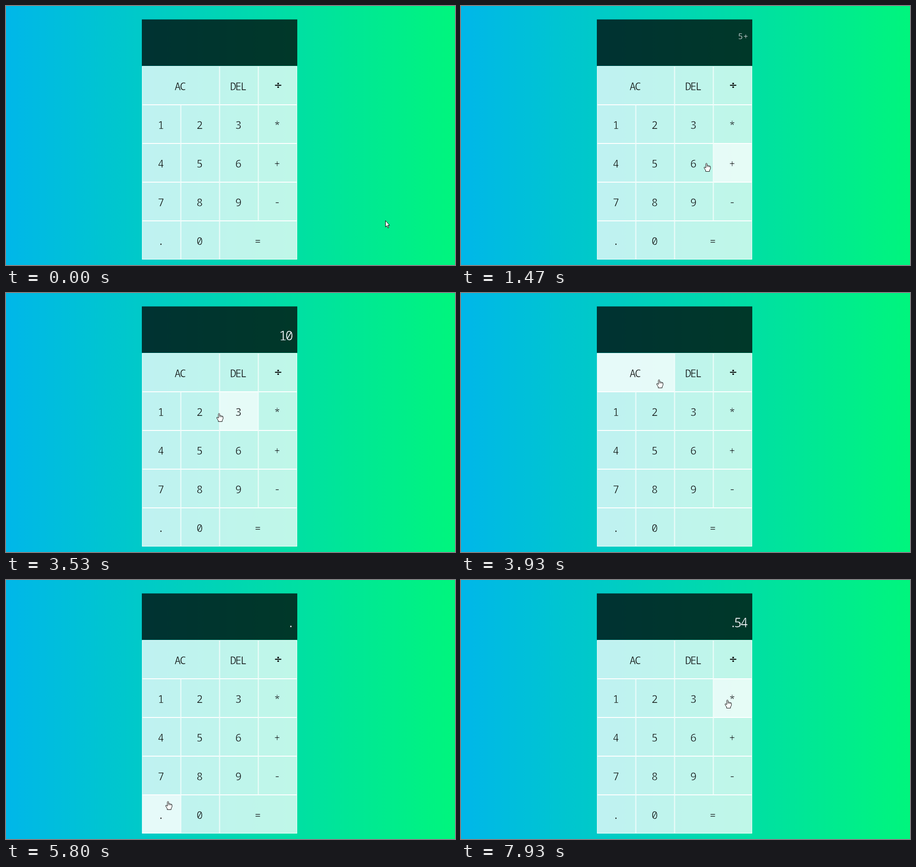
Recreate the animation shown at these times as an HTML page. Size 985 by 569 pixels, loop 8000 ms.

```html
<!DOCTYPE html>
<html lang="en">
<head>
<meta charset="utf-8">
<title>Calculator</title>
<style>
  html, body { margin: 0; width: 100%; height: 100%; overflow: hidden; }
  svg { display: block; width: 100%; height: 100%; }
  text {
    font-family: "Noto Sans Mono", "DejaVu Sans Mono", monospace;
    font-weight: 300;
    text-anchor: middle;
    stroke-width: .6;   /* a stroke in the ground colour thins the letters */
  }
  .key { --ground: #c0f3ec; --veil: .75; }
  .key.hover { --ground: #e5faf8; --veil: .9; }
  .key .face { fill: rgba(255, 255, 255, var(--veil)); }
  .key .edge { fill: none; stroke: #fff; }
  .key text { font-size: 23px; stroke: var(--ground); }
  .key .divide { font: 21px "DejaVu Sans", sans-serif; stroke: #000; }
  #prev, #cur { stroke: #003530; }
  #prev { font-size: 18px; fill: rgba(255, 255, 255, .8); stroke-width: .3; }
  #cur { font-size: 29px; fill: #fff; }
  #arrow, #hand { fill: #fff; stroke: #000; stroke-linejoin: round; }
</style>
</head>
<body>
<svg viewBox="0 0 985 569" preserveAspectRatio="none">
  <defs>
    <linearGradient id="sky" gradientUnits="userSpaceOnUse" x1="-201.5" x2="1138.5" y1="0" y2="0">
      <stop offset="0" stop-color="#00aaff"/>
      <stop offset="1" stop-color="#00ff6c"/>
    </linearGradient>
  </defs>
  <rect width="985" height="569" fill="url(#sky)"/>
  <rect x="298" y="29.5" width="341" height="102" fill="rgba(0,0,0,.75)"/>
  <text id="prev"></text>
  <text id="cur"></text>
  <g id="keys"></g>
  <g id="cursor">
    <path id="arrow" d="M.5.5V14.5L3.6 11.6L5.8 16.7L7.8 15.8L5.6 10.8H9.7Z"/>
    <g id="hand" transform="translate(.5 0)">
      <path d="M-1.5 1.5Q0-.8 1.3 1.5V5.4Q2.8 4.4 3.9 6Q5.4 5 6.4 6.7Q8.7 6 8.7 8.5V12.5L6.7 16V18.5H-1.8V16L-5 11Q-5.8 8.6-3.7 8.8L-1.5 11Z"/>
      <path d="M1.3 5.4V9M3.9 6V9M6.4 6.7V9.2" fill="none" stroke-width=".8"/>
    </g>
  </g>
</svg>
<script>
const LOOP = 8000, FPS = 15, LEFT = 298.5, TOP = 132, CELL = 85;
const $ = id => document.getElementById(id);

function add(parent, tag, attrs) {
  const el = document.createElementNS("http://www.w3.org/2000/svg", tag);
  for (const name in attrs) el.setAttribute(name, attrs[name]);
  return parent.appendChild(el);
}

// Labels by row; a repeated label makes one wide key.
const rows = ["AC AC DEL ÷", "1 2 3 *", "4 5 6 +", "7 8 9 -", ". 0 = ="].map(r => r.split(" "));
const keys = {};

rows.forEach((row, r) => row.forEach((label, c) => {
  if (keys[label]) return;
  const x = LEFT + c * CELL, y = TOP + r * CELL;
  const w = row.filter(s => s === label).length * CELL;
  const el = add($("keys"), "g", { class: "key" });
  add(el, "rect", { class: "face", x, y, width: w, height: CELL });
  add(el, "rect", { class: "edge", x: x + .5, y: y + .5, width: w - 1, height: CELL - 1 });
  const divide = label === "÷";
  const mid = x + w / 2 + (divide ? 1 : -1);
  const xs = [...label].map((_, i) => mid + (i - (label.length - 1) / 2) * 11.5);
  const text = add(el, "text", {
    class: divide ? "divide" : "label",
    x: xs.join(" "),
    y: y + (divide ? 48.5 : label === "-" ? 51 : 53)
  });
  text.textContent = label;
  keys[label] = { el, x: x + w / 2, y: y + CELL / 2 };
}));

// One visit per key; dx and dy lead away from the key's centre.
const visits = [
  { key: "5", leave: 70, arrive: 670, press: 800 },
  { key: "+", leave: 870, arrive: 1140, press: 1270, dx: -8 },
  { key: "5", leave: 1400, arrive: 1670, press: 1800 },
  { key: "=", leave: 1870, arrive: 2270, press: 2670, dx: 34, dy: 17 },
  { key: "AC", leave: 2940, arrive: 3800, press: 3930, dx: 50, dy: 15 },
  { key: "8", leave: 4200, arrive: 4930, dx: -25 },
  { key: ".", leave: 5140, arrive: 5530, press: 5730 },
  { key: "5", leave: 5740, arrive: 6200, press: 6400 },
  { key: "4", leave: 6540, arrive: 7000, press: 7200, dx: 6, dy: 14 },
  { key: "*", leave: 7210, arrive: 7930, dx: -12, dy: 3 }
];

const ease = k => 1 - (1 - k) ** 1.3;

function tipAt(t) {
  let x = 832, y = 471;
  for (const { key, leave, arrive, dx = 0, dy = 0 } of visits) {
    const k = ease(Math.min(1, Math.max(0, (t - leave) / (arrive - leave))));
    x += (keys[key].x + dx - x) * k;
    y += (keys[key].y + dy - y) * k;
  }
  return [x, y];
}

function keyAt([x, y]) {
  const row = rows[Math.floor((y - TOP) / CELL)];
  return row && row[Math.floor((x - LEFT) / CELL)];
}

function operandsAt(t) {
  let prev = "", cur = "";
  for (const { key, press } of visits) {
    if (!(press <= t)) continue;
    if (key === "AC") prev = cur = "";
    else if (key === "+") [prev, cur] = [cur + key, ""];
    else if (key === "=") [prev, cur] = ["", String(parseFloat(prev) + Number(cur))];
    else cur += key;
  }
  return [prev, cur];
}

// Right-aligned number; the point is narrower than a digit.
function show(id, str, y, right, advance) {
  const xs = [];
  for (const ch of [...str].reverse()) {
    const w = ch === "." ? advance / 2 : advance;
    xs.unshift(right - w / 2);
    right -= w;
  }
  const el = $(id);
  el.textContent = str;
  el.setAttribute("x", xs.join(" ") || 0);
  el.setAttribute("y", y);
}

function draw(t) {
  const step = Math.floor((t + 4) * FPS / 1000);
  const [x, y] = tipAt(step * 1000 / FPS);
  const over = keyAt(tipAt((step - 1) * 1000 / FPS));   // hover trails by one step
  for (const label in keys) keys[label].el.classList.toggle("hover", label === over);
  $("cursor").setAttribute("transform", `translate(${Math.round(x)} ${Math.round(y)})`);
  $("arrow").style.display = over ? "none" : "";
  $("hand").style.display = over ? "" : "none";

  const [prev, cur] = operandsAt(t);
  const both = prev && cur;
  show("prev", prev, both ? 64 : 73, 630.5, 11.5);
  show("cur", cur, both ? 110 : 104, 628.5, 14);
}

const start = performance.now();
function tick() {
  draw((performance.now() - start) % LOOP);
  requestAnimationFrame(tick);
}
tick();
</script>
</body>
</html>
```
